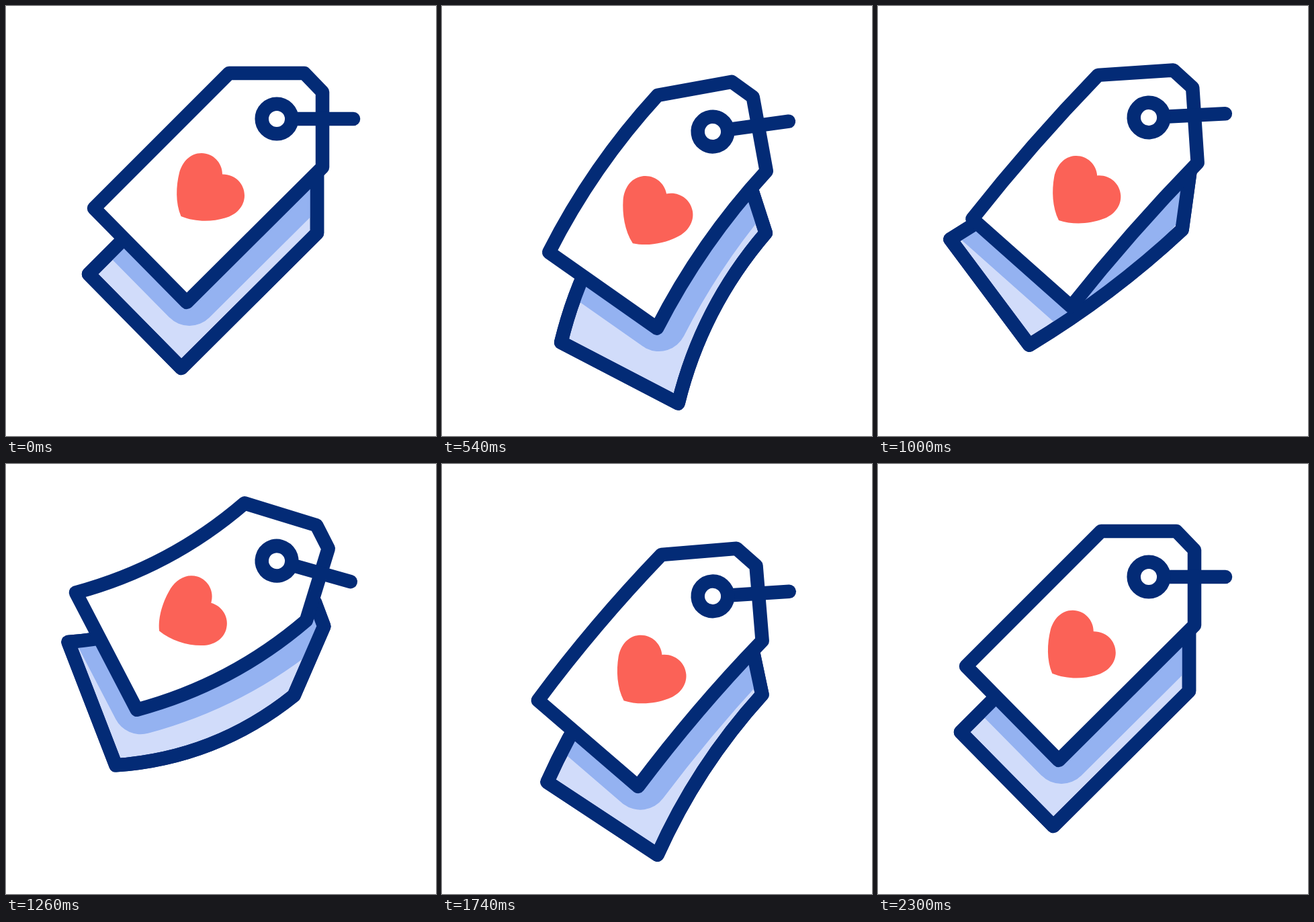
An HTML page with a canvas for the animation above (2400 ms loop, 640 by 640 pixels).

```html
<!DOCTYPE html>
<html>
<head>
<meta charset="utf-8">
<title>Swinging tags</title>
<style>
  html, body { margin: 0; height: 100%; overflow: hidden; background: #fff; }
  canvas { display: block; }
</style>
</head>
<body>
<canvas id="stage" width="640" height="640"></canvas>
<script>
const ctx = document.getElementById('stage').getContext('2d');
const LOOP = 2400;
const NAVY = '#032b76', PALE = '#d1dcfa', SHADE = '#94b2f1', CORAL = '#fb6257';

// Each track is a list of [time, value] extremes, joined by sine easing.
const front = {
  x: 403, y: 168,
  angle: [[200, 0], [760, -15.5], [1380, 20.3], [1860, -9], [2240, 0]],
  bob: [[200, 0], [720, 26], [1240, -24], [1720, 29], [2200, 0]]
};
const back = {
  x: 395, y: 266,
  angle: [[160, 0], [640, -20], [1250, 23.5], [1740, -12], [2100, 0]],
  bob: [[120, 0], [560, 24.5], [1160, -21], [1580, 26], [2120, 0]]
};
const heartScale = [[120, 1], [380, 1.055], [640, 1], [1660, 1], [1980, 1.09], [2280, 1]];
const heartDrift = [[2100, 0], [2240, -2], [2380, 0]];

// The heart is drawn around its own centre.
const heart = new Path2D(`M17.5 -19C17.5 -36.5 3.5 -50.5 -13.5 -50.5
  C-30.5 -50.5 -42 -37.5 -46.5 -21.5C-51.5 -1.5 -52.5 23.5 -44 43.5
  C-23.5 52 1.5 52 21.5 46C38.5 41.5 50.5 28.5 50.5 12.5
  C50.5 -5.5 35.5 -19.5 17.5 -19Z`);

const rad = degrees => degrees * Math.PI / 180;

function valueAt(track, t) {
  if (t <= track[0][0]) return track[0][1];
  for (let i = 1; i < track.length; i++) {
    const [t0, v0] = track[i - 1], [t1, v1] = track[i];
    if (t < t1) return v0 + (v1 - v0) * (1 - Math.cos(Math.PI * (t - t0) / (t1 - t0))) / 2;
  }
  return track[track.length - 1][1];
}

// Outline relative to the hole; the long sides bow with the swing.
function tagPath(angle) {
  const bow = angle * 1.34;
  const path = new Path2D();
  path.moveTo(-71, -68);
  path.lineTo(41, -68);
  path.lineTo(68, -40);
  path.lineTo(68, 72);
  path.quadraticCurveTo(-33 + bow, 172.5 + bow, -134, 273);
  path.lineTo(-272, 133);
  path.quadraticCurveTo(-171.5 + bow, 32.5 + bow, -71, -68);
  path.closePath();
  return path;
}

function poseAt(tag, t) {
  const angle = valueAt(tag.angle, t);
  return { x: tag.x, y: tag.y + valueAt(tag.bob, t), angle, path: tagPath(angle) };
}

function place(pose, angle = pose.angle) {
  ctx.resetTransform();
  ctx.translate(pose.x, pose.y);
  ctx.rotate(rad(angle));
}

function paint(path, fill, stroke, width) {
  ctx.fillStyle = fill;
  ctx.strokeStyle = stroke;
  ctx.lineWidth = width;
  ctx.fill(path);
  ctx.stroke(path);
}

function drawBack(pose, cover) {
  place(pose);
  paint(pose.path, PALE, NAVY, 20.5);
  ctx.save();
  ctx.clip(pose.path);
  place(cover);
  ctx.translate(4, -7);
  paint(cover.path, SHADE, SHADE, 84);
  ctx.restore();
  place(pose);
  ctx.stroke(pose.path);
}

function drawFront(pose, t) {
  const { angle } = pose;
  place(pose);
  paint(pose.path, '#fff', NAVY, 20.5);

  const shift = angle * 0.35 + valueAt(heartDrift, t);
  const scale = valueAt(heartScale, t);
  ctx.translate(-98.5 + shift, 101.5 + shift);
  ctx.scale(scale, scale);
  ctx.fillStyle = CORAL;
  ctx.fill(heart);

  place(pose, angle * (angle < 0 ? 0.75 : 0.92));
  const string = new Path2D();
  string.moveTo(24, 0);
  string.lineTo(114, 0);
  ctx.stroke(string);
  const ring = new Path2D();
  ring.arc(0, 0, 22.3, 0, Math.PI * 2);
  paint(ring, '#fff', NAVY, 20.5);
}

function draw(now) {
  const t = now % LOOP;
  ctx.resetTransform();
  ctx.clearRect(0, 0, 640, 640);
  ctx.lineJoin = ctx.lineCap = 'round';
  const frontPose = poseAt(front, t);
  drawBack(poseAt(back, t), frontPose);
  drawFront(frontPose, t);
}

let start;
function tick(now) {
  start ??= now;
  draw(now - start);
  requestAnimationFrame(tick);
}
requestAnimationFrame(tick);
</script>
</body>
</html>
```
